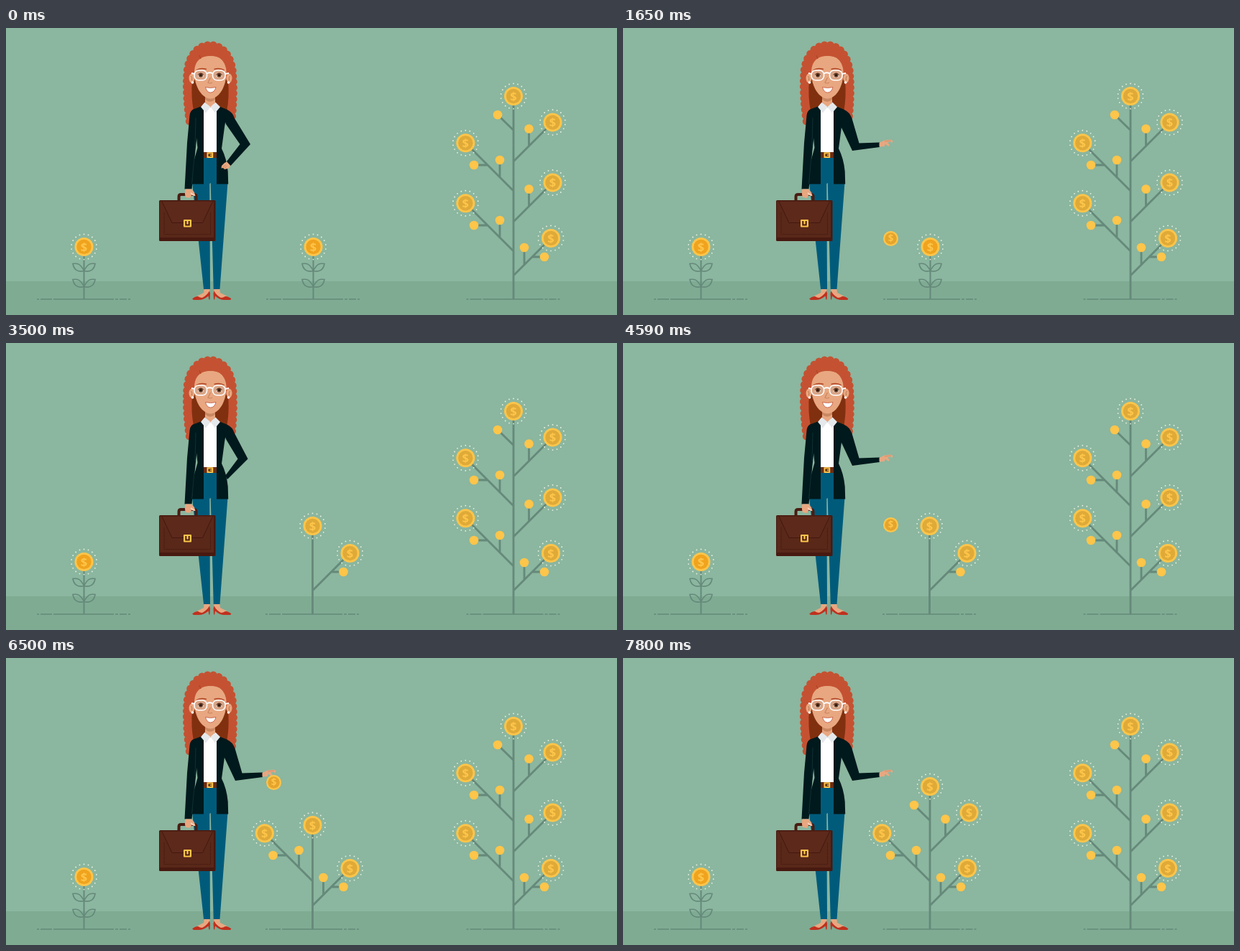
Animation of 850 by 400 pixels, one loop 8000 ms. Source, as an HTML page:

```html
<!DOCTYPE html>
<html lang="en">
<head>
<meta charset="utf-8">
<title>Money trees</title>
<style>
html, body { margin: 0; width: 850px; height: 400px; overflow: hidden; background: #8bb69f; }
svg { display: block; }
text { font: 700 16.5px "Open Sans", "Noto Sans", sans-serif; text-anchor: middle; }
.line { fill: none; stroke: #65897a; }
</style>
</head>
<body>
<svg id="stage" width="850" height="400" viewBox="0 0 850 400">
  <defs><clipPath id="above"><rect width="850" height="377"/></clipPath></defs>
  <rect width="850" height="400" fill="#8bb69f"/>
  <rect y="353" width="850" height="47" fill="#7fab93"/>
  <g id="plants"></g>

  <g id="woman">
    <!-- hair: a plain fill with a scalloped rim -->
    <path d="M253 131 Q250 95 251.500 66 C252 41 265 24 284 24 C303 24 315 41 316 66 Q318 95 314 131 L306 132 L300 105 H266 L261 132Z" fill="#c45232"/>
    <path d="M255 130 Q250 95 251.500 66 C252 41 265 23.500 284 23.500 C303 23.500 315 41 316 66 Q318 95 314 130" fill="none" stroke="#c45232" stroke-width="10.500" stroke-linecap="round" stroke-dasharray="0 8"/>
    <path d="M259 72 H309 Q311 98 307 116 H261 Q257 95 259 72Z" fill="#81300f"/>

    <!-- legs and shoes -->
    <path d="M276 362 H283.500 L283 370 L273 377 L262 377 L267 373 L275 369Z M289 362 H297 L298 369 L306 373 L311 377 L300 377 L290 370Z" fill="#e8a780"/>
    <path d="M259 377.500 Q263 373.500 267 374 Q270 376 273 376 Q279 373 283 366.500 L284 370 L283.500 378.500 H282.300 L281.500 373.500 Q275 379 268 379 H261Z M313.500 377.500 Q309 373.500 305 374 Q302 376 299 376 Q293 373 289.500 366.500 L288.500 370 L289 378.500 H290.200 L291 373.500 Q297 379 304 379 H312Z" fill="#c0301e"/>
    <path d="M273 180 H296 L308.500 215 L297.500 364 H288.700 L284.700 216 L283.300 217 L284 364 H275 L259 215Z" fill="#005b7b"/>

    <!-- shirt, belt and jacket -->
    <path d="M274 106 H294 V174 H274Z" fill="#fff"/>
    <path d="M274 173 H294 V181 H274Z" fill="#6a2d16"/>
    <rect x="280.500" y="174.300" width="6.700" height="5.700" fill="#4d210f" stroke="#fdc54a" stroke-width="2"/>
    <path d="M283.500 177.200 H288" stroke="#fdc54a" stroke-width="1.500"/>
    <path d="M275 108 V217.500 H259 L260 190 L266.500 167 L261 114Z M293 108 V217.500 H309.200 L308.700 200 Q307 182 300 168 L304 138 L308 114Z" fill="#00191c"/>
    <path d="M275 108 L260 113.500 Q256 116 255.500 122 L252 160 L248.500 224.500 H258.500 L263.500 170 L268 130Z" fill="#00191c"/>
    <path d="M262 180 L258.500 217 M264 125 L263 165" stroke="#18383b" stroke-width=".7"/>

    <!-- neck and collar -->
    <path d="M277 94 H291 V104 L284.500 111 L277 104Z" fill="#e8a780"/>
    <path d="M277 95 H291 V99.500 Q284 106 277 99.500Z" fill="#c98861"/>
    <path d="M276.500 103.500 L284.500 110 L278 118.500 L271 110Z M291.500 103.500 L284.500 110 L291 118.500 L298 110Z" fill="#e5e9ec"/>

    <!-- head -->
    <g fill="#e8a780">
      <ellipse cx="258.500" cy="70" rx="4" ry="6.500"/>
      <ellipse cx="310.500" cy="70" rx="4" ry="6.500"/>
      <path d="M262 62 C262 46 271 39 284.500 39 C298 39 306.500 46 306.500 62 C306.500 82 296 98.500 284.500 98.500 C273 98.500 262 82 262 62Z"/>
    </g>
    <path d="M257.500 67 Q259.500 69 258.500 73 M311.500 67 Q309.500 69 310.500 73" fill="none" stroke="#b9764f"/>
    <path d="M259 64 C259 48 262 39 270 38.500 Q285 36 297 41 Q306 48 308 64 L314 55 L300 30 H268 L254 52Z" fill="#c45232"/>
    <path d="M269 38 L271 43" stroke="#a94223"/>
    <circle cx="259.500" cy="76" r="1.800" fill="#fff"/>
    <circle cx="309.500" cy="76" r="1.800" fill="#fff"/>
    <path d="M265 59 Q270 55 279 57.500 M303.500 59 Q298 55 289.500 57.500" fill="none" stroke="#b54b2a" stroke-width="1.800"/>
    <g id="lenses"></g>
    <g id="open"></g>
    <g id="closed" fill="none" stroke="#5d321f" stroke-width="1.400"><path d="M267 67 Q271.500 70 276 67 M292 67 Q296.500 70 301 67"/></g>
    <path d="M284.500 69 L281 76 Q284 78 287 76" fill="none" stroke="#c98561" stroke-width="1.200"/>
    <path d="M277.500 82.500 Q284.500 84.500 292 82.500 Q290 90 284.500 90 Q279.500 90 277.500 82.500Z" fill="#fff" stroke="#c3543d" stroke-width=".8"/>

    <!-- briefcase and the hand that holds it -->
    <path d="M240.500 242 V235 Q240.500 232 243.500 232 H261.500 Q264.500 232 264.500 235 V242" fill="none" stroke="#4a1c12" stroke-width="4"/>
    <path d="M249.500 224.500 H258 L262 229 L263.500 234 L258 233 L256 237 L250 236 Q248 231 249.500 224.500Z" fill="#e8a780"/>
    <path d="M257 230 L262.500 233.500" stroke="#f8d8c4" stroke-width="1.500"/>
    <rect x="213" y="240" width="78.500" height="57" rx="1.500" fill="#481a11"/>
    <rect x="214" y="241.500" width="75" height="50.500" fill="#592819"/>
    <path d="M217 242 L231 271.500 H273.500 L287.500 242" fill="#5d291b" stroke="#431810"/>
    <path d="M220 257 V287.500 H284.500 V257" fill="none" stroke="#431810" stroke-dasharray="1.500 1"/>
    <rect x="247" y="267" width="11" height="10.500" rx="1" fill="#fdc54a"/>
    <path d="M250.300 269 V274.500 H254.700 V269" fill="none" stroke="#4a1c12" stroke-width="2"/>

    <!-- arm poses -->
    <g id="hip" fill="#00191c"><path d="M298 110 L308 114 Q315 117 318 126 L336.500 161.500 L308 190 L305 185 L322.500 161.500 L306 134Z"/></g>
    <g id="hipHand">
      <path d="M308 186 L312.500 191 L310 195.500 L304 197 L302 195 L299.500 195.500 L300 192 L304 188Z" fill="#e8a780"/>
      <path d="M301 194 L306 191 M303 196 L307 193" stroke="#c98561" stroke-width=".8"/>
      <path d="M298 110 L308 114 Q315 117 318 126 L340 162 L312.500 192 L307 186 L325.500 162 L306 134Z" fill="#00191c"/>
    </g>
    <g id="out">
      <path d="M298 110 L308 114 Q315 117 318.500 126 L328.500 160.500 L357 159.500 V166 L319 171 L303.500 138Z" fill="#00191c"/>
      <path d="M356.500 160 L364 156.500 L373 155.500 L375.500 157.500 L374 160.500 L372.500 158.500 L368 159.500 L371 163 L369 165 L365 161.500 L363.500 165 L356.500 165.500Z" fill="#e8a780"/>
      <path d="M364 158 L373 157" stroke="#c98561" stroke-width=".7"/>
    </g>
  </g>
  <g clip-path="url(#above)"><g id="drop"></g></g>
</svg>
<script>
const el = id => document.getElementById(id);
const show = (id, on) => el(id).setAttribute('display', on ? 'inline' : 'none');
const path = (d, w) => `<path class="line" d="${d}" stroke-width="${w}"/>`;
const disc = (x, y, r, fill) => `<circle cx="${x}" cy="${y}" r="${r}" fill="${fill}"/>`;

function coin(x, y, inner = '#dfaa38', r = 13) {
  return `<g transform="translate(${x} ${y}) scale(${r / 13})">${disc(0, 0, 13, '#fdc54a')}${disc(0, 0, 10.2, inner)}
    <text y="5.9" fill="#fdc54a">$</text></g>`;
}

function halo(x, y) {
  let dots = '';
  for (let i = 0; i < 18; i++) {
    const a = i * Math.PI / 9;
    dots += disc(x + 17.6 * Math.sin(a), y - 17.6 * Math.cos(a), .9, '#e9f3e3');
  }
  return dots;
}

const shiny = (x, y, inner) => halo(x, y) + coin(x, y, inner);
const bud = (x, y) => disc(x, y, 6.3, '#fdc54a');
const soil = x => path(`M${x - 65.5} 378 h3 m2 0 h16 m2 0 h84 m2 0 h4 m2 0 h10 m2 0 h3`, 1.5);

function seedling(x) {
  const leaf = (y, s) => `M${x} ${y} C${x + 5 * s} ${y - 10} ${x + 9 * s} ${y - 11} ${x + 15.5 * s} ${y - 10}
    C${x + 14 * s} ${y - 1} ${x + 8 * s} ${y + 2} ${x} ${y}`;
  return soil(x) + path(`M${x} 317 V378`, 2) +
    path([338.5, 360.5].map(y => leaf(y, 1) + leaf(y, -1)).join(''), 1.6) + shiny(x, 305, '#f0a31e');
}

// Branches: foot height, sideways reach, then the buds on it
const branches = [
  { y: 345, dx: 52, up: 15, side: 26, tip: 43 },
  { y: 311, dx: -66.7, up: 19, side: 36, tip: 55 },
  { y: 270, dx: 54.5, up: 21.5 },
  { y: 227, dx: -66.7, up: 19, side: 36, tip: 55 },
  { y: 186, dx: 54.5, up: 21.5 }
];

function tree(x, count, top, twigY, sparse) {
  let wood = `M${x} 378 V${top + 10}`, fruit = '';
  for (const b of branches.slice(0, count)) {
    const s = Math.sign(b.dx), at = d => [x + s * d, b.y - d];
    wood += `M${x} ${b.y} l${b.dx} ${-Math.abs(b.dx)}`;
    if (!sparse) {
      const [ux, uy] = at(b.up);
      wood += `M${ux} ${uy + 1} v-24`;
      fruit += bud(ux, uy - 24);
    }
    if (b.side) {
      const [sx, sy] = at(b.side);
      wood += `M${sx} ${sy} H${x + s * b.tip}`;
      fruit += bud(x + s * b.tip, sy);
    }
    fruit += shiny(x + b.dx, b.y - Math.abs(b.dx));
  }
  if (twigY) {
    wood += `M${x} ${twigY} l-22 -21.500`;
    fruit += bud(x - 22, twigY - 21.5);
  }
  return soil(x) + path(wood, 2.8) + fruit + shiny(x, top);
}

const stages = [seedling(427.5), tree(426.5, 1, 255, 0, true), tree(426.5, 2, 233), tree(427, 3, 179, 226.5)];
el('plants').innerHTML = seedling(108.5) + tree(706, 5, 95, 142.5) +
  stages.map((s, i) => `<g id="stage${i}">${s}</g>`).join('');
el('drop').innerHTML = coin(0, 0, '#e5a42d', 10.5);

el('lenses').innerHTML = [262, 287.5].map(x =>
  `<rect x="${x}" y="59" width="17.500" height="13.700" rx="6" fill="#d9a587" stroke="#fff" stroke-width="1.600"/>`).join('') +
  '<path d="M279.500 63.500 Q283.500 61 287.500 63.500 M258 63 L262.500 64 M305 64 L310 63" fill="none" stroke="#fff" stroke-width="1.800"/>';
el('open').innerHTML = [271, 296.5].map(x =>
  `<ellipse cx="${x}" cy="66" rx="4.300" ry="3" fill="#ecd9cb"/>${disc(x, 65.8, 3, '#6b4028')}${disc(x, 65.8, 1.5, '#27140c')}
  <path d="M${x - 4.3} 65.500 Q${x} 60.500 ${x + 4.3} 65.500" fill="none" stroke="#5d321f"/>`).join('');

// Each round: arm out with coin, release, growth, arm back
const rounds = [[1000, 1500, 2300, 2800], [4000, 4500, 5300, 6000], [6500, 7000, 7800, 8000]];
const within = (t, a, b) => t >= a && t < b;

function draw() {
  const t = performance.now() % 8000;
  const out = rounds.some(r => within(t, r[0], r[3]));
  show('out', out);
  show('hipHand', t < 1000);
  show('hip', !out && t >= 1000);

  const blink = within(t, 3300, 3500) || within(t, 5800, 6000);
  show('open', !blink);
  show('closed', blink);

  const grown = rounds.filter(r => t >= r[2]).length;
  stages.forEach((_, i) => show('stage' + i, i === grown));

  const held = rounds.find(r => within(t, r[0], r[1] + 300));
  show('drop', held);
  if (held) {
    const step = Math.max(0, Math.floor((t - held[1]) / 30) + 1);
    el('drop').setAttribute('transform', `translate(372.5 ${173.5 + 20 * step})`);
  }
  requestAnimationFrame(draw);
}
draw();
</script>
</body>
</html>
```
